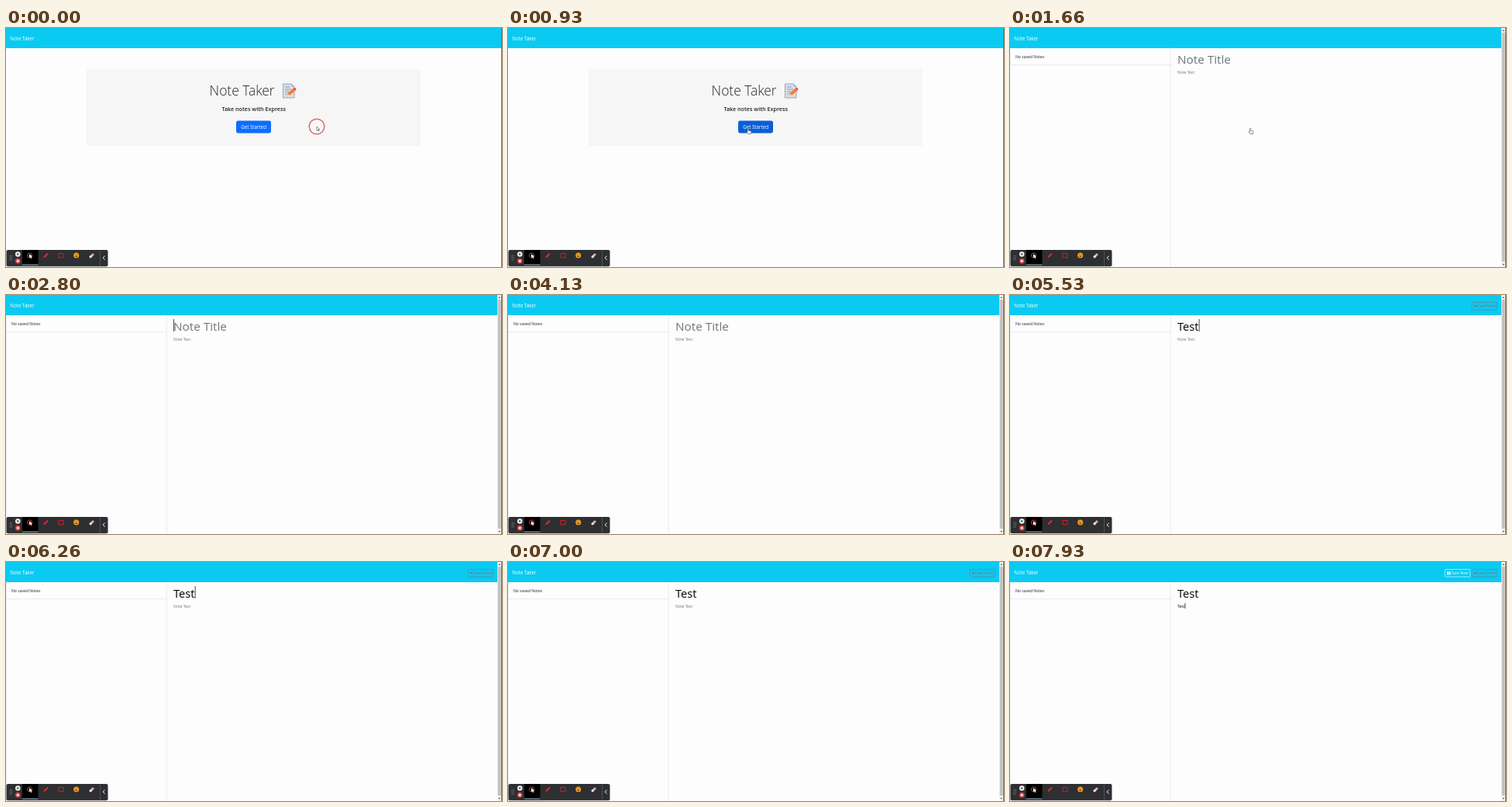
Animation, 640 px wide and 308 px high, one loop 8000 ms. Source, as an HTML page:

```html
<!DOCTYPE html>
<html lang="en">
<head>
<meta charset="utf-8">
<title>Note Taker</title>
<style>
  html, body { margin: 0; width: 100%; height: 100%; overflow: hidden; background: #fdfdfd; }
  svg { display: block; width: 100%; height: 100%; }
  text { font-family: "Open Sans", "Noto Sans", sans-serif; fill: #212529; }
  .white { fill: #fff; }
  .hint { fill: #6f757a; }
  .typed { fill: #000; }
  .label { font: bold 2.9px "Open Sans", Arial, sans-serif; fill: #fff; text-anchor: middle; }
  .mid { text-anchor: middle; }
  .line { fill: none; stroke: #dcdfe2; stroke-width: .6; }
</style>
</head>
<body>
<svg viewBox="0 0 640 308" preserveAspectRatio="none">
  <rect width="640" height="308" fill="#fdfdfd"/>
  <rect id="nav" width="639" height="26" fill="#0bcaf1"/>
  <text class="white" x="5.3" y="15.7" font-size="6.2">Note Taker</text>

  <g id="home">
    <rect x="104" y="53" width="431" height="98.7" fill="#f6f6f6"/>
    <text x="262.6" y="87.4" font-size="17.4" font-weight="300">Note Taker</text>
    <g id="memo">
      <path d="M357.5 72h11l3.5 3.5V90h-14.500z" fill="#d9dfe9" stroke="#8b93a6" stroke-width=".8"/>
      <path d="M368.500 72v3.500h3.500z" fill="#a9b2c6"/>
      <path d="M360 76h6M360 79h8M360 82h5M360 85h4" stroke="#8d8fb0" stroke-width=".9"/>
      <path d="M361.500 88.500l2-4.500 2.700 2.700z" fill="#f3c79b"/>
      <path d="M363.500 84l7.200-6.200 2.700 2.800-7.200 6.100z" fill="#f47b31"/>
      <path d="M370.700 77.800l1.300-1.100q2.400.4 2.600 2.800l-1.200 1.100z" fill="#e0454f"/>
    </g>
    <text class="mid" x="319.7" y="106.800" font-size="7.200" font-weight="600">Take notes with Express</text>
    <rect id="start" x="297" y="119.500" width="45" height="16" rx="2.400"/>
    <text class="white mid" x="319.6" y="130" font-size="6.200">Get Started</text>
  </g>

  <g id="notes">
    <path class="line" d="M.3 26V308M0 47.500H207M207.200 26V308"/>
    <text x="7" y="38.800" font-size="5.100">No saved Notes</text>
    <text id="title" x="216" y="45.500"></text>
    <text id="body" x="216" y="58.500" font-size="5"></text>
    <rect id="caret" width=".8" fill="#222"/>
    <g id="save">
      <rect x="561.300" y="9.500" width="32.400" height="9.600" rx="1.300" fill="none" stroke="#fff" stroke-width=".6"/>
      <path d="M564 12h3.700l.8.800V16.600H564z" fill="#fff"/>
      <path d="M565 12.600h2.300v1.200H565zM565.500 15h1.500v1h-1.500z" fill="#0bcaf1"/>
      <text class="white" x="570" y="16" font-size="4.500">Save Note</text>
    </g>
    <g id="clear">
      <rect x="596" y="9.500" width="32.600" height="9.600" rx="1.300" fill="none" stroke="#667f95" stroke-width=".7"/>
      <path d="M599 12.800l2.600 2.600M601.600 12.800l-2.600 2.600" stroke="#a84c5d" stroke-width="1"/>
      <text x="603" y="16" font-size="4.500" style="fill:#936174">Clear Form</text>
    </g>
    <rect x="634" width="6" height="308" fill="#f1f1f1"/>
    <rect x="634.700" y="6" width="4" height="295" fill="#c1c1c1"/>
    <path d="M635.300 4l1.400-1.800 1.400 1.800zM635.300 304l1.400 1.800 1.400-1.800z" fill="#505050"/>
  </g>
  <path d="M639.600 0V308" stroke="#333" stroke-width=".8"/>

  <g id="toolbar">
    <rect x=".5" y="286" width="131" height="21.300" rx="2" fill="#2e2f32"/>
    <rect x="21" y="286" width="20.500" height="19.300" fill="#000"/>
    <rect x="21" y="304.600" width="20.500" height="1" fill="#8fb5c9"/>
    <path d="M5.200 293v7M7.200 293v7" stroke="#999" stroke-width=".9" stroke-dasharray=".9 1"/>
    <circle cx="15.300" cy="291.500" r="3.200" fill="#fff"/>
    <path d="M14.500 290v3M16.100 290v3" stroke="#222" stroke-width=".8"/>
    <circle cx="15.300" cy="300.300" r="3.200" fill="#e84a4a"/>
    <rect x="14.100" y="299.100" width="2.400" height="2.400" fill="#fff"/>
    <circle cx="30.500" cy="293" r="3" fill="none" stroke="#d94747" stroke-width=".9"/>
    <path d="M30 291.300l4.200 3.200-1.800.3 1 1.900-1 .5-1-1.900-1.300 1.200z" fill="#fff"/>
    <path d="M48.300 296.300l.8-2.400 4-4 1.600 1.600-4 4z" fill="#e32b2b"/>
    <rect x="68" y="290.500" width="6" height="5.300" fill="none" stroke="#cf1f1f" stroke-width="1"/>
    <circle cx="90.700" cy="293" r="3.500" fill="#f5a623"/>
    <path d="M88.600 293.500q2.100 3.600 4.200 0z" fill="#7a3b12"/>
    <path d="M89.400 291v1M92 291v1" stroke="#7a3b12" stroke-width=".8"/>
    <path d="M107.500 294.500l4.300-4.300 2.200 1.800-4.300 4.300h-1.500z" fill="#f0a5ad"/>
    <path d="M107.500 294.500l1.500-1.500 2.200 1.800-1.500 1.500h-1.500z" fill="#eee"/>
    <path d="M121.500 286.500V307" stroke="#66686c" stroke-width=".6"/>
    <path d="M127.500 293.700l-2.300 2.500 2.300 2.500" fill="none" stroke="#fff" stroke-width="1"/>
  </g>

  <circle id="ring" r="9.800" fill="#fff" fill-opacity=".25" stroke="#e4686c" stroke-width="1.500"/>
  <g id="cursor">
    <path id="arrow" d="M0-2v5l1.200-1 .9 1.900.9-.4-.9-1.800h1.600z" fill="#fff" stroke="#444" stroke-width=".6"/>
    <path id="hand" d="M-1.200-3.300q.8-.8 1.500 0V-.7l2.400.5q1 .3.800 1.500l-.6 2.200H-.7L-2.600.8q.2-1 1.400-.2z" fill="#fff" stroke="#444" stroke-width=".6"/>
    <path id="beam" d="M-1.200-3h2.400M0-3v6M-1.200 3h2.400" fill="none" stroke="#444" stroke-width=".5"/>
  </g>
</svg>
<script>
  const LOOP = 8000, BLINK = 530;
  const PAGE_AT = 1400, TITLE_FOCUS = 2500, BODY_FOCUS = 7050;
  const titleKeys = [4600, 4760, 4930, 5100];
  const bodyKeys = [7470, 7580, 7680, 7800];
  const path = [[0, 401, 129], [130, 401, 129], [760, 310.500, 133], [1680, 310.500, 133], [2400, 242, 41]];
  const clicks = [[0, 200, 401, 127], [1090, 1290, 310.500, 132]];

  const $ = id => document.getElementById(id);
  const show = (id, on) => { $(id).style.display = on ? "" : "none"; };
  const ease = p => p * p * (3 - 2 * p);
  const typed = (keys, t) => "Test".slice(0, keys.filter(k => t >= k).length);

  function pointer(t) {
    const i = path.findIndex(p => p[0] > t);
    if (i < 0) return path.at(-1).slice(1);
    const [t0, x0, y0] = path[i - 1], [t1, x1, y1] = path[i];
    const p = ease((t - t0) / (t1 - t0));
    return [x0 + (x1 - x0) * p, y0 + (y1 - y0) * p];
  }

  function field(id, value, hint, hintSize, size) {
    const el = $(id);
    el.textContent = value || hint;
    el.setAttribute("class", value ? "typed" : "hint");
    el.setAttribute("font-size", value ? size : hintSize);
    return value ? el.getComputedTextLength() : 0;
  }

  function drawCaret(t, titleWidth, bodyWidth) {
    const inBody = t >= BODY_FOCUS;
    const resets = [TITLE_FOCUS, ...titleKeys, BODY_FOCUS, ...bodyKeys];
    const since = t - Math.max(...resets.filter(r => r <= t));
    show("caret", t >= TITLE_FOCUS && Math.floor(since / BLINK) % 2 === 0);
    const caret = $("caret");
    caret.setAttribute("x", 216.200 + (inBody ? bodyWidth : titleWidth));
    caret.setAttribute("y", inBody ? 53 : 31);
    caret.setAttribute("height", inBody ? 7 : 16);
  }

  function drawPointer(t) {
    const [x, y] = pointer(t);
    $("cursor").setAttribute("transform", `translate(${x} ${y})`);
    const kind = t > 1690 ? "beam" : x < 342 ? "hand" : "arrow";
    for (const id of ["arrow", "hand", "beam"]) show(id, id === kind);
    show("cursor", t < TITLE_FOCUS);
    const click = clicks.find(c => t >= c[0] && t < c[1]);
    show("ring", click);
    if (click) $("ring").setAttribute("transform", `translate(${click[2]} ${click[3]})`);
    const hover = Math.min(1, Math.max(0, (t - 560) / 150));
    $("start").setAttribute("fill", `rgb(${13 - 2 * hover} ${110 - 16 * hover} ${253 - 38 * hover})`);
  }

  function draw(t) {
    const onNotes = t >= PAGE_AT;
    show("home", !onNotes);
    show("notes", onNotes);
    const title = typed(titleKeys, t), body = typed(bodyKeys, t);
    const titleWidth = field("title", title, "Note Title", 15.300, 14.700);
    const bodyWidth = field("body", body, "Note Text", 5, 5);
    show("clear", title);
    show("save", title && body);
    drawCaret(t, titleWidth, bodyWidth);
    drawPointer(t);
  }

  const start = performance.now();
  function tick() {
    draw((performance.now() - start) % LOOP);
    requestAnimationFrame(tick);
  }
  tick();
</script>
</body>
</html>
```
